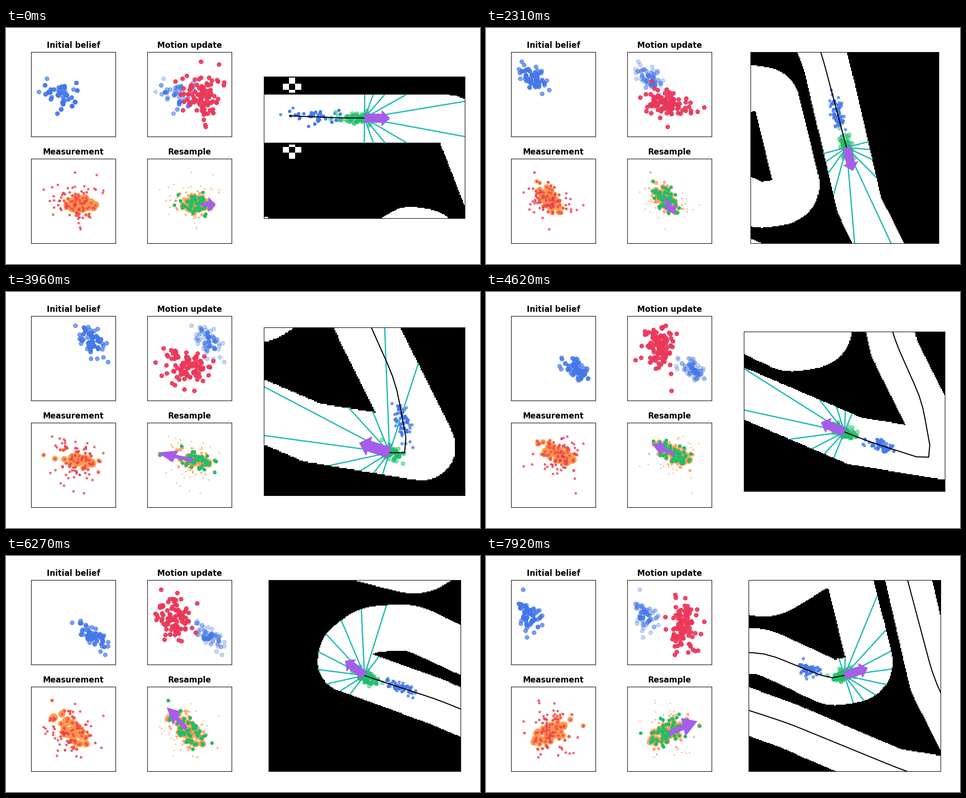
A matplotlib script for the animation above (8000 ms loop, 1000 by 500 pixels).

```python
import numpy as np
import matplotlib.pyplot as plt
from matplotlib.animation import FuncAnimation
from matplotlib.collections import LineCollection
from matplotlib.patches import Polygon

W, H = 1000, 500
LOOP, TICK, HOLD, STEPS = 8000, 50, 330, 25
BLUE, RED, ORANGE = "#4478ea", "#eb3759", "#ff9543"
GREEN, PURPLE, TEAL = "#1dbf6b", "#a55eea", "#22bdb5"

# World units: one map cell, y pointing down
LEFT, RIGHT, BOTTOM = -240, 242, 419
HALF_ROAD, REACH = 23.9, 100
MAP_MID, MAP_SIZE = (756.3, 253.1), (424, 405)
COUNT, NOISE = 100, 5.5

# Corners as (x, y, length cut off on both sides by the rounding)
ROAD = [(-200, 90, 0), (-200, 42.3, 30), (91.8, 42.3, 9), (125, 128, 0),
        (159.5, 276, 0), (213, 384, 8), (120, 368.7, 0), (9, 321, 0),
        (-94, 283.5, 8), (-90.5, 264.5, 8), (-66, 245, 15), (-20, 241.8, 15),
        (54, 276.5, 8), (98.5, 270, 24), (70.8, 157, 12), (43, 153.3, 5),
        (-10, 186, 17), (-200, 140, 30), (-200, 90, 0)]
ROUTE = [(-74.5, 39, 0), (-25, 41, 0), (89.5, 42, 30), (119, 113, 20),
         (160, 268, 15), (187, 329, 15), (198, 390, 15), (131, 368.5, 20),
         (9.4, 318.5, 15), (-81, 288.8, 18), (-71, 244, 25), (-15, 244.8, 15),
         (48, 270.2, 8), (60, 271.2, 2), (68, 268.5, 0)]
START = 74.5  # distance already driven when the loop begins


def rounded(corners):
    """Polyline through the corners, each rounded by a quadratic curve."""
    pts = np.array([c[:2] for c in corners], float)
    t = np.linspace(0, 1, 9)[:, None]
    line = [pts[:1]]
    for a, b, c, (_, _, cut) in zip(pts, pts[1:], pts[2:], corners[1:]):
        p = b + cut * (a - b) / np.hypot(*(a - b))
        q = b + cut * (c - b) / np.hypot(*(c - b))
        line.append((1 - t) ** 2 * p + 2 * t * (1 - t) * b + t ** 2 * q
                    if cut else b[None])
    return np.vstack(line + [pts[-1:]])


def build_map():
    x, y = np.meshgrid(np.arange(LEFT, RIGHT) + 0.5, np.arange(BOTTOM) + 0.5)
    free = np.zeros(x.shape, bool)
    road = rounded(ROAD)
    for (ax, ay), (bx, by) in zip(road[:-1], road[1:]):
        dx, dy = bx - ax, by - ay
        t = np.clip(((x - ax) * dx + (y - ay) * dy) / (dx * dx + dy * dy), 0, 1)
        free |= (x - ax - t * dx) ** 2 + (y - ay - t * dy) ** 2 < HALF_ROAD ** 2
    # Checkered marks on both sides of the start line
    for top, low, high in ((7, 0, 16), (70, 68, 84)):
        for i, j in ((0, -1), (0, 1), (-1, 0), (1, 0)):
            col = -75 + 6 * i - LEFT
            y0, y1 = np.clip((top + 6 * j, top + 6 * j + 6), low, high)
            free[y0:y1, col:col + 6] = True
    return free


def cast_rays(free, pos, heading):
    t = np.arange(0, 300, 0.5)
    rays = []
    for a in heading + np.radians(np.arange(-90, 91, 20)):
        pts = pos + np.outer(t, (np.cos(a), np.sin(a)))
        col = np.floor(pts[:, 0]).astype(int) - LEFT
        row = np.floor(pts[:, 1]).astype(int)
        inside = (col >= 0) & (col < free.shape[1]) & (row >= 0) & (row < BOTTOM)
        clear = np.zeros(len(t), bool)
        clear[inside] = free[row[inside], col[inside]]
        hit = len(t) - 1 if clear.all() else np.argmin(clear)
        rays.append((pos, pts[hit]))
    return rays


def arrow(pos, heading, length, width, head_w, head_l):
    neck, w, hw = length - head_l, width / 2, head_w / 2
    shape = np.array([(0, -w), (neck, -w), (neck, -hw), (length, 0),
                      (neck, hw), (neck, w), (0, w)])
    c, s = np.cos(heading), np.sin(heading)
    return pos + shape @ np.array([(c, s), (-s, c)])


def simulate():
    """Particle filter along the route, one dict of results per step."""
    rng = np.random.default_rng(7)
    free = build_map()
    route = rounded(ROUTE)
    dist = np.r_[0, np.cumsum(np.hypot(*np.diff(route, axis=0).T))]
    end = dist[-1]
    stride = (end - START) / (STEPS - 1)

    def at(d):
        return np.stack([np.interp(d, dist, route[:, i]) for i in (0, 1)], -1)

    prior = at(START - 46) + rng.normal(0, (15, 4.5), (COUNT, 2))
    prior = prior[rng.integers(0, COUNT // 2, COUNT)]
    last = at(START - stride)
    out = []
    for k in range(STEPS):
        d = START + k * stride
        pos = at(d)
        fwd = at(min(d + 8, end)) - at(min(d, end - 8))
        fwd /= np.hypot(*fwd)
        heading = np.arctan2(fwd[1], fwd[0])

        moved = prior + pos - last + rng.normal(0, NOISE, (COUNT, 2))
        along = (moved - pos) @ fwd
        side = (moved - pos) @ np.array([-fwd[1], fwd[0]])
        weight = np.exp(-0.5 * (along / 13) ** 2 - 0.5 * (side / 2.8) ** 2)
        weight *= rng.lognormal(0, 0.35, COUNT)
        ladder = np.cumsum(weight) / weight.sum()
        pick = np.searchsorted(ladder, (np.arange(COUNT) + rng.random()) / COUNT)
        post = moved[np.minimum(pick, COUNT - 1)]

        out.append(dict(pos=pos, heading=heading, prior=prior, moved=moved,
                        post=post, size=190 * weight / weight.max() + 1,
                        rays=cast_rays(free, pos, heading),
                        trail=at(np.linspace(0, d, 7 + 3 * k))))
        prior, last = post, pos
    return free, out


def rect(x0, y0, x1, y1):
    return [x0 / W, 1 - y1 / H, (x1 - x0) / W, (y1 - y0) / H]


def bare_axes(x, y, w, h, title=None):
    ax = fig.add_axes(rect(x, y, x + w, y + h))
    ax.set_xticks([])
    ax.set_yticks([])
    if title:
        ax.set_title(title, fontweight="bold", fontsize=12)
    return ax


def panel(col, row, title):
    return bare_axes((53.1, 298.4)[col], (50.6, 276.6)[row], 178, 179, title)


def dots(ax, color, size, alpha, z=2):
    return ax.scatter([], [], s=size, color=color, alpha=alpha, zorder=z)


def patch(ax, z):
    return ax.add_patch(Polygon([(0, 0)] * 3, color=PURPLE, lw=0, zorder=z))


def fit(axes, pts, width, height):
    """Scale the points to fill width x height pixels of a panel."""
    lo, hi = pts.min(axis=0), pts.max(axis=0)
    mid = (lo + hi) / 2
    hx, hy = (hi - lo) / 2 * 178.5 / np.array([width, height])
    for ax in axes:
        ax.set_xlim(mid[0] - hx, mid[0] + hx)
        ax.set_ylim(mid[1] + hy, mid[1] - hy)


free, steps = simulate()

plt.rcParams["font.family"] = "DejaVu Sans"
fig = plt.figure(figsize=(W / 100, H / 100), dpi=100, facecolor="white")
ax_init = panel(0, 0, "Initial belief")
ax_move = panel(1, 0, "Motion update")
ax_meas = panel(0, 1, "Measurement")
ax_samp = panel(1, 1, "Resample")
ax_map = bare_axes(544.3, 50.6, *MAP_SIZE)

init_dots = dots(ax_init, BLUE, 36, 0.7)
move_old = dots(ax_move, BLUE, 36, 0.3)
move_new = dots(ax_move, RED, 36, 0.92, 3)
meas_weight = dots(ax_meas, ORANGE, 1, 0.9)
meas_dots = dots(ax_meas, RED, 9, 0.6, 3)
samp_weight = dots(ax_samp, ORANGE, 1, 0.7)
samp_dots = dots(ax_samp, GREEN, 20, 1, 3)
samp_arrow = patch(ax_samp, 4)

ax_map.imshow(free, cmap="gray", vmin=0, vmax=1, interpolation="nearest",
              extent=(LEFT, RIGHT, BOTTOM, 0), aspect="auto")
map_rays = ax_map.add_collection(LineCollection([], colors=TEAL, lw=2, zorder=2))
map_prior = dots(ax_map, BLUE, 16, 0.7, 3)
map_post = dots(ax_map, GREEN, 36, 0.5, 4)
map_trail, = ax_map.plot([], [], color="black", lw=1.6, zorder=5)
map_arrow = patch(ax_map, 6)


def frame_map(pos):
    """Crop the map around the robot and fit the crop into its slot."""
    x0, x1 = max(pos[0] - REACH, LEFT), min(pos[0] + REACH, RIGHT)
    y0, y1 = max(pos[1] - REACH, 0), min(pos[1] + REACH, BOTTOM)
    scale = min(MAP_SIZE[0] / (x1 - x0), MAP_SIZE[1] / (y1 - y0))
    w, h = (x1 - x0) * scale / 2, (y1 - y0) * scale / 2
    cx, cy = MAP_MID
    ax_map.set_position(rect(cx - w, cy - h, cx + w, cy + h))
    ax_map.set_xlim(x0, x1)
    ax_map.set_ylim(y1, y0)


def update(frame):
    k = min(((frame + 1) * TICK - 1) // HOLD, STEPS - 1)
    s = steps[k]
    for d in (init_dots, move_old, map_prior):
        d.set_offsets(s["prior"])
    for d in (move_new, meas_weight, meas_dots, samp_weight):
        d.set_offsets(s["moved"])
    for d in (samp_dots, map_post):
        d.set_offsets(s["post"])
    meas_weight.set_sizes(s["size"])
    samp_weight.set_sizes(s["size"])

    fit((ax_init, ax_move), np.vstack([s["prior"], s["moved"]]), 146, 138)
    fit((ax_meas, ax_samp), s["moved"], 126, 120)
    samp_arrow.set_xy(arrow(s["pos"], s["heading"], 18.5, 2.6, 9, 9.3))

    frame_map(s["pos"])
    map_rays.set_segments(s["rays"])
    map_trail.set_data(*s["trail"].T)
    map_arrow.set_xy(arrow(s["pos"], s["heading"], 25.5, 9, 16.5, 8.5))
    return []


anim = FuncAnimation(fig, update, frames=LOOP // TICK, interval=TICK,
                     init_func=lambda: update(0), repeat=True, repeat_delay=0,
                     blit=False, cache_frame_data=False)
plt.show()
```
